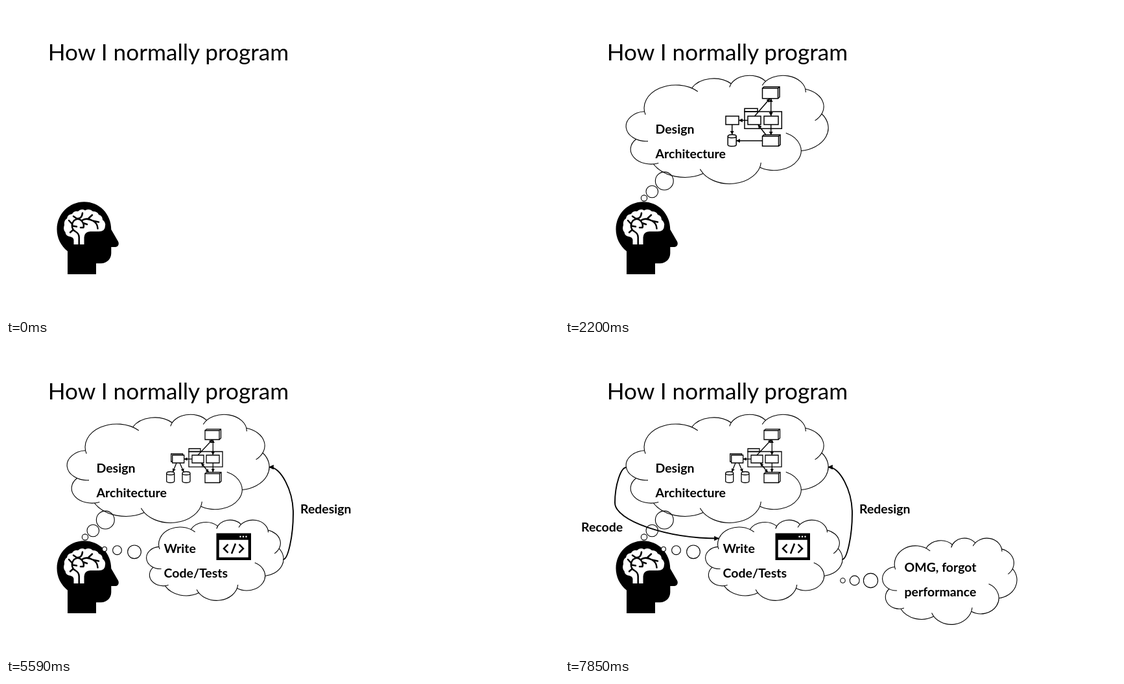
Write an HTML page that moves like this. It is 853 px wide and 480 px high and loops after 8 s.

```html
<!DOCTYPE html>
<html lang="en">
<head>
<meta charset="utf-8">
<title>How I normally program</title>
<style>
  html, body { margin: 0; width: 100%; height: 100%; overflow: hidden; background: #fff; }
  svg { display: block; width: 100%; height: 100%; }
  text { font: bold 19.5px Lato, sans-serif; }
  .title { font-weight: 400; font-size: 35.2px; }
  .line { fill: none; stroke: #000; }
  .bubble { fill: #fff; stroke: #000; stroke-width: 1.1; }
</style>
</head>
<body>
<svg id="stage" viewBox="0 0 853 480">
  <defs>
    <marker id="tip" viewBox="0 0 10 10" refX="9" refY="5" markerWidth="4" markerHeight="4" orient="auto-start-reverse">
      <path d="M0 0L10 5L0 10Z"/>
    </marker>
  </defs>

  <text class="title" x="64.8" y="83.5">How I normally program</text>

  <g id="head">
    <path d="M95 414V378.5C84.500 370 78.500 358 78.500 344.500C78.500 321 97.300 302.300 120.500 302.300C144 302.300 162.300 321 162.300 345
      L173 363.500C175 367.500 173 372 168.500 372H162.300V381.500C162.300 390.500 155.500 397.200 146.500 397.200H139V414Z"/>
    <path fill="#fff" d="M104.5 368V361Q104 357 99 356Q92 355 91.500 349Q87.500 345 90 338Q89 331 94 328Q95 321.500 102 321
      Q105 316 111 317Q116 312 122 315.500Q129 312 134 317Q141 317 143 322Q149 324 149 330Q154 334 153 339
      Q153 348 143 348H130Q121 348.500 120.500 357V368Z"/>
    <path class="line" stroke-width="2.5" stroke-linecap="round" stroke-linejoin="round" d="M112.7 369V357Q112.700 351 107 348L103.500 345.500L99 349.500
      M104 346Q99 338 105 331Q112 326 117 332Q121 337 119.500 342H115M103 339.500L109 340.500M102.500 337L97 331
      M104 324.500L109 328Q117 329 118 319.500M117 331Q124 326 134 331.500L143 333.500
      M126 329L133 322.500M134 331.500Q141 335 141.500 343.500M119 335L125 337"/>
  </g>

  <g data-from="1070" data-cloud="94.4 106.7 311.6 167.1" data-bubbles="153.3,270 134.3,286.5 122,296.5">
    <text x="139.5" y="197">Design</text>
    <text x="139.5" y="235">Architecture</text>
  </g>
  <g id="firstDesign" data-from="2200" data-to="5590" class="line" stroke-width="1.5"></g>
  <g id="secondDesign" data-from="5590" class="line" stroke-width="1.3"></g>

  <g data-from="3330" data-cloud="216.8 269.7 211.2 124.2" data-bubbles="198,319.3 171.5,316.7 152,315">
    <text x="243.5" y="321">Write</text>
    <text x="243.5" y="359">Code/Tests</text>
  </g>
  <g data-from="4460">
    <path fill-rule="evenodd" d="M324.5 290.5H378V332H324.5ZM328.7 300.7V327.7H373.7V300.7Z"/>
    <path stroke="#fff" stroke-width="2.5" stroke-linecap="round" d="M361.5 295.7h0M366 295.7h0M370.5 295.7h0"/>
    <path class="line" stroke-width="2.5" d="M342.5 307.7L336 314.2L342.5 320.7M359.5 307.7L366 314.2L359.5 320.7M348 322L354 306.5"/>
  </g>

  <g data-from="5590">
    <path class="line" stroke-width="1.9" marker-end="url(#tip)" d="M427.5 331C435 331 443 295 443 259.7S424 188.5 406 188.5"/>
    <text x="454" y="260">Redesign</text>
  </g>
  <g data-from="6720">
    <path class="line" stroke-width="1.9" marker-end="url(#tip)" d="M94.5 189C86 189 77 216 77 243.5S157 298.5 237 298.5"/>
    <text x="25" y="288">Recode</text>
  </g>
  <g data-from="7850" data-cloud="489.8 297.7 207.2 133.2" data-bubbles="471.5,363.5 446.7,363.5 428.5,363.5">
    <text x="523.5" y="350">OMG, forgot</text>
    <text x="523.5" y="388">performance</text>
  </g>
</svg>

<script>
const LOOP = 8000;

function add(parent, tag, attributes, first = false) {
  const node = document.createElementNS('http://www.w3.org/2000/svg', tag);
  for (const key in attributes) node.setAttribute(key, attributes[key]);
  parent.insertBefore(node, first ? parent.firstChild : null);
}

// Lobes on a 43.2 unit square: radii, start angle, sweep, overshoot before and after.
const LOBES = [
  [6.753, 9.19, -190.49, 123.78, 11.86, 12.32],
  [5.333, 7.267, -144.1, 89.95, 0, 0],
  [4.365, 5.945, -145.81, 99.72, 17.69, 0],
  [4.857, 6.595, -130.99, 117.24, 18.2, 14.86],
  [5.333, 7.273, -78.71, 109.03, 0, 27.75],
  [6.775, 9.22, -46.27, 130.27, 0, 0],
  [5.785, 7.867, 0.62, 114.03, 70.92, 0],
  [6.752, 9.215, 22.45, 115.17, 16, 14.08],
  [7.72, 10.543, 66.24, 75.71, 0, 0],
  [4.36, 5.918, -274.94, 146.74, 11.45, 0],
  [4.345, 5.945, -246.83, 152.52, 26.43, 0]
];

function onEllipse(rx, ry, degrees) {
  const a = degrees * Math.PI / 180;
  const t = Math.atan2(rx * Math.sin(a), ry * Math.cos(a));
  return [rx * Math.cos(t), ry * Math.sin(t)];
}

function cloudPath(left, top, width, height) {
  const sx = width / 43.2, sy = height / 43.2;
  let x = 3.9, y = 14.37, d = '';
  for (const [rx, ry, start, sweep, before, after] of LOBES) {
    const [dx, dy] = onEllipse(rx, ry, start);
    const cx = x - dx, cy = y - dy;
    const place = degrees => {
      const [px, py] = onEllipse(rx, ry, degrees);
      return [left + (cx + px) * sx, top + (cy + py) * sy];
    };
    const large = before + sweep + after > 180 ? 1 : 0;
    d += `M${place(start - before)}A${rx * sx} ${ry * sy} 0 ${large} 1 ${place(start + sweep + after)}`;
    const [ex, ey] = onEllipse(rx, ry, start + sweep);
    x = cx + ex;
    y = cy + ey;
  }
  return d;
}

for (const group of document.querySelectorAll('[data-cloud]')) {
  const box = group.dataset.cloud.split(' ').map(Number);
  add(group, 'path', { class: 'line', 'stroke-width': 1.1, d: cloudPath(...box) }, true);
  group.dataset.bubbles.split(' ').forEach((spot, i) => {
    const [cx, cy] = spot.split(',');
    add(group, 'circle', { class: 'bubble', cx, cy, r: box[3] * (3 - i) / 36 }, true);
  });
}

function sketcher(id) {
  const group = document.getElementById(id);
  const path = (d, extra = {}) => add(group, 'path', { d, ...extra });
  const rect = (x, y, w, h) => path(`M${x} ${y}h${w}v${h}h${-w}Z`);
  return {
    path,
    rect,
    block(x, y, w, h) {
      rect(x, y, w, h);
      path(`M${x} ${y}l2.5 -2.2h${w}v${h}l-2.5 2.2M${x + w} ${y}l2.5 -2.2`);
    },
    drum(x, y, r, h) {
      path(`M${x - r} ${y}a${r} 2.5 0 0 1 ${2 * r} 0a${r} 2.5 0 0 1 ${-2 * r} 0v${h}a${r} 2.5 0 0 0 ${2 * r} 0v${-h}`);
    },
    arrow(x1, y1, x2, y2, both) {
      const tip = 'url(#tip)';
      path(`M${x1} ${y1}L${x2} ${y2}`, both ? { 'marker-start': tip, 'marker-end': tip } : { 'marker-end': tip });
    }
  };
}

const first = sketcher('firstDesign');
first.block(304.5, 127, 24, 15.7);
first.rect(277, 158.3, 20, 4.7);
first.rect(277, 163, 57.3, 26.3);
first.rect(282, 170, 20, 13);
first.rect(307, 170, 22, 13);
first.rect(248, 170, 20, 13);
first.drum(257.7, 201, 6.5, 13);
first.block(304.5, 201, 25, 15.3);
first.arrow(282, 176.5, 268.5, 176.5);
first.arrow(257.7, 183, 257.7, 198);
first.arrow(292.5, 170, 316, 143);
first.arrow(317.7, 143, 317.7, 169.5, true);
first.arrow(317.7, 183, 317.7, 199);
first.arrow(310, 199, 298, 183.5);
first.arrow(304, 208, 264.5, 208);

const second = sketcher('secondDesign');
second.block(307, 132, 22, 14);
second.rect(282, 160, 18, 4.5);
second.rect(282, 164.5, 52, 23.7);
second.rect(287, 170, 18, 12);
second.rect(309, 170, 20, 12);
second.rect(256.7, 170, 18, 12);
second.path('M256.7 180h-2v-12h18v2');
second.drum(253.7, 198, 6, 12);
second.drum(278, 198, 6, 12);
second.block(307, 198.5, 22.5, 14);
second.arrow(287, 176, 275, 176);
second.arrow(263, 182, 257.5, 195.5);
second.arrow(268, 182, 274, 195.5);
second.arrow(296, 170, 318, 146.5);
second.arrow(319.3, 146.5, 319.3, 169.5, true);
second.arrow(319.3, 182, 319.3, 196);
second.arrow(301.5, 182.5, 312.5, 196.5, true);

const steps = [...document.querySelectorAll('[data-from]')];
const origin = performance.now();

function draw() {
  const time = (performance.now() - origin) % LOOP;
  for (const step of steps) {
    const shown = time >= +step.dataset.from && time < +(step.dataset.to || LOOP);
    step.style.visibility = shown ? 'visible' : 'hidden';
  }
  requestAnimationFrame(draw);
}
draw();
</script>
</body>
</html>
```
